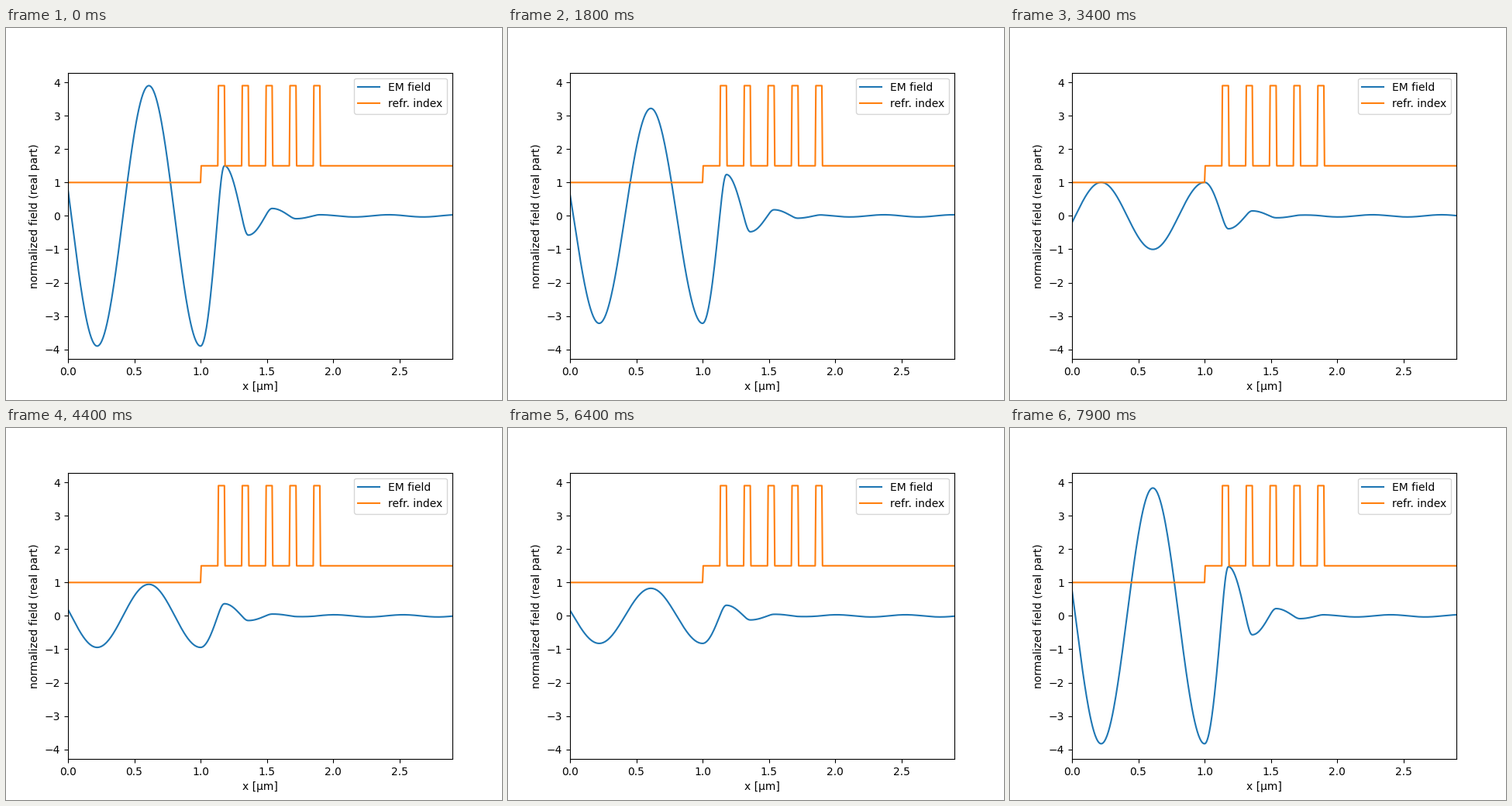
These frames come from a looping animation (640 px wide and 480 px high, 8 s). A matplotlib script:

```python
import numpy as np
import matplotlib.pyplot as plt
from matplotlib.animation import FuncAnimation

WAVELENGTH = 0.78
N_LOW, N_HIGH = 1.5, 3.9
PAIRS = 5
PEAK = 3.9
FRAMES = 80
PHASE_STEP = 20 * np.pi / 199

# Quarter-wave stack: vacuum, (low, high) pairs, then substrate
widths = [1.0] + [0.13, 0.05] * PAIRS + [1.0]
indices = np.array([1.0] + [N_LOW, N_HIGH] * PAIRS + [N_LOW])
edges = np.round(np.cumsum(widths), 6)

x = np.round(np.linspace(0, 2.9, 581), 6)
layer = np.searchsorted(edges, x, side="left")


def solve_field():
    """Propagate the outgoing wave backwards through the stack."""
    k = 2 * np.pi / WAVELENGTH * indices
    start = edges[-2]
    field = np.exp(1j * k[-1] * (x - start))
    e, de = 1 + 0j, 1j * k[-1]
    for i in range(len(widths) - 2, -1, -1):
        inside = layer == i
        s = k[i] * (x[inside] - edges[i])
        field[inside] = e * np.cos(s) + de / k[i] * np.sin(s)
        d = -k[i] * widths[i]
        e, de = (e * np.cos(d) + de / k[i] * np.sin(d),
                 de * np.cos(d) - e * k[i] * np.sin(d))
    return PEAK * field / np.abs(field).max()


field = solve_field()

fig, ax = plt.subplots(figsize=(6.4, 4.8), dpi=100)
wave, = ax.plot(x, field.real, label="EM field")
ax.plot(x, indices[layer], label="refr. index")
ax.set_xlim(0, 2.9)
ax.set_ylim(-1.1 * PEAK, 1.1 * PEAK)
ax.set_xlabel("x [µm]")
ax.set_ylabel("normalized field (real part)")
ax.legend(loc="upper right")


def update(i):
    wave.set_ydata((field * np.exp(-1j * PHASE_STEP * i)).real)
    return wave,


anim = FuncAnimation(fig, update, frames=FRAMES, interval=100,
                     repeat=True, repeat_delay=0)
plt.show()
```
